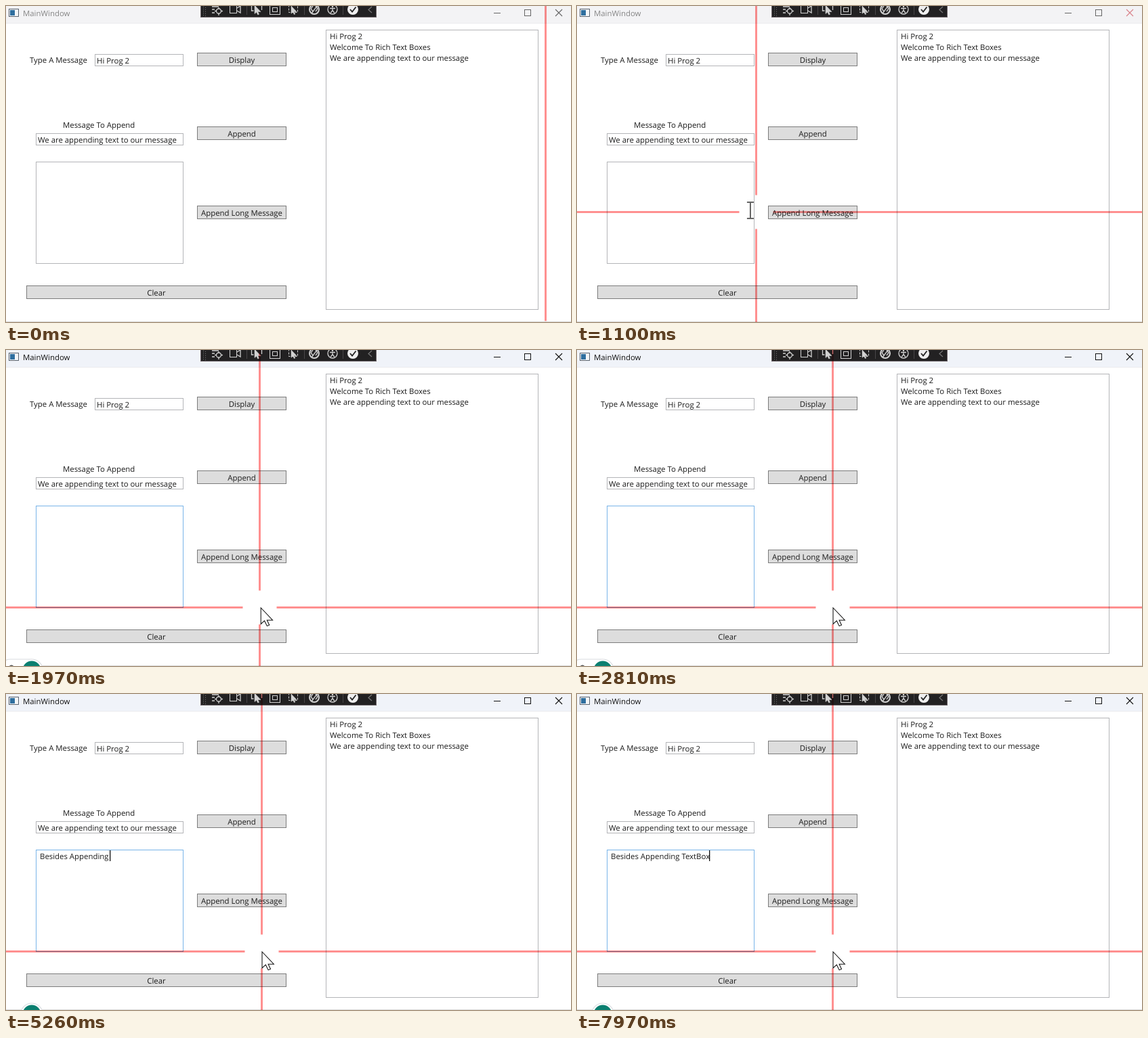
Write an HTML page with a canvas that moves like this. It is 834 px wide and 467 px high and loops after 8 s.

```html
<!DOCTYPE html>
<html lang="en">
<head>
<meta charset="utf-8">
<title>MainWindow</title>
<style>
html, body { margin: 0; width: 834px; height: 467px; overflow: hidden; background: #fff; }
canvas { display: block; }
</style>
</head>
<body>
<canvas id="stage" width="834" height="467"></canvas>
<script>
const c = document.getElementById('stage').getContext('2d');
const LOOP = 8000, FOCUS = 1310, BLINK = 500, STEP = 74;
const INK = '#1b1b1b', EDGE = '#b4b5b8', ICON = '#d2d2d2';

const clamp = v => Math.min(1, Math.max(0, v));
const mix = (a, b, k) => a + (b - a) * k;
const easeOut = (k, power) => 1 - (1 - clamp(k)) ** power;

// Typing speed: a quick run, a hesitant word start, a quick finish.
const message = 'Besides Appending TextBox';
const pace = [[1, 3110], [18, 5110], [21, 7050], [25, 7750]];
const keys = [...message].map((_, i) => {
  const s = Math.max(1, pace.findIndex(p => p[0] >= i + 1));
  const [n0, t0] = pace[s - 1], [n1, t1] = pace[s];
  return mix(t0, t1, (i + 1 - n0) / (n1 - n0));
});

function text(s, x, y, color = INK, align = 'left') {
  c.fillStyle = color;
  c.textAlign = align;
  c.fillText(s, x, y);
}

function rect(x, y, w, h, fill, stroke) {
  if (fill) {
    c.fillStyle = fill;
    c.fillRect(x, y, w, h);
  }
  if (!stroke) return;
  c.strokeStyle = stroke;
  c.lineWidth = 1;
  c.strokeRect(x + .5, y + .5, w - 1, h - 1);
}

function disc(x, y, r, fill, stroke, width = 1.3) {
  c.beginPath();
  c.arc(x, y, r, 0, 7);
  if (fill) { c.fillStyle = fill; c.fill(); }
  if (stroke) { c.strokeStyle = stroke; c.lineWidth = width; c.stroke(); }
}

// Strokes, and optionally fills, an SVG path placed at x, y.
function shape(d, x, y, stroke, width = 1.3, fill, scale = 1) {
  const p = new Path2D(d);
  c.save();
  c.translate(x, y);
  c.scale(scale, scale);
  if (fill) { c.fillStyle = fill; c.fill(p); }
  c.strokeStyle = stroke;
  c.lineWidth = width;
  c.stroke(p);
  c.restore();
}

function arrow(x, y, scale, fill, stroke) {
  shape('M0 0V25L5.5 20L9.5 28L13 26.5L9.5 19H18Z', x, y, stroke, 1.1, fill, scale);
}

function iBeam(x, y, color) {
  shape('M0-11V11M-5-12H5M-5 12H5', x, y, color, 1.5);
}

function titleBar(t) {
  const active = t >= FOCUS, ink = active ? '#111' : '#666';
  rect(0, 0, 834, 25, active ? '#f0f3f9' : '#f3f3f5');
  rect(0, 25, 834, 1, '#ebebee');
  rect(4, 4, 15, 12, '#f4f6f8', '#5a6470');
  rect(6, 6, 7, 8, '#2f6f9f');
  text('MainWindow', 25, 15, active ? '#111' : '#858585');
  shape('M0 0H10', 720, 10.5, ink, 1);
  rect(765, 5, 10, 10, null, ink);
  shape('M-5-5L5 5M5-5L-5 5', 816, 10, t >= 70 && !active ? '#d98088' : ink, 1.1);
}

function toolbar() {
  rect(287, -2, 260, 19, '#222122', '#6d6468');
  for (let y = 1; y < 14; y += 3) {
    rect(291, y, 1, 1, '#777');
    rect(294, y + 1, 1, 1, '#777');
  }
  for (const x of [355, 440, 497]) rect(x, 0, 1, 13, '#484648');

  shape('M0 1H10M0 5H4M0 10H4M10 2V14M4 7.5H16', 304, 0, ICON);
  disc(314, 7.5, 3.5, '#222122', ICON);
  rect(330, -2, 11, 13, null, ICON);
  shape('M0 3L5 0V10L0 7', 341, 0, ICON);
  shape('M0-1V7H3M15-1V6', 362.5, 0, ICON);
  arrow(367, -1, .5, ICON, ICON);
  rect(389, -2, 16, 15, null, ICON);
  rect(393, 2, 8, 7, null, ICON);
  c.setLineDash([3, 2]);
  rect(417, -2, 14, 12, null, ICON);
  c.setLineDash([]);
  arrow(421, 0, .45, ICON, ICON);
  disc(455, 5, 7, null, ICON, 2);
  shape('M-2-5L-5-1L-2 3M2-5L5-1L2 3M-4 6L4-5', 455, 5, ICON);
  disc(482, 5, 7, null, ICON);
  disc(482, 1, 1.2, ICON);
  shape('M-4 0H4M0 0V3L-3 7M0 3L3 7', 482, 3.5, ICON);
  disc(512, 5, 8, '#efefef');
  shape('M-4 0L-1 3.5L4.5-3.5', 512, 5, '#222', 1.8);
  shape('M5 0L0 4.5L5 9', 535, 1, '#777', 1.2);
}

function button(s, x, y, w) {
  rect(x, y, w, 20, '#dddddd', '#7c7c7c');
  text(s, x + w / 2, y + 15, INK, 'center');
}

function form(t) {
  text('Type A Message', 35, 84);
  rect(131, 71, 131, 18, '#fff', EDGE);
  text('Hi Prog 2', 134, 85);
  text('Message To Append', 84, 180);
  rect(44, 188, 218, 18, '#fff', EDGE);
  text('We are appending text to our message', 47, 202);
  rect(44, 230, 218, 151, '#fff', t >= FOCUS ? '#78b4e8' : EDGE);
  button('Display', 282, 69, 132);
  button('Append', 282, 178, 132);
  button('Append Long Message', 282, 295, 132);
  button('Clear', 30, 413, 384);
  rect(472, 35, 314, 414, '#fff', EDGE);
  ['Hi Prog 2', 'Welcome To Rich Text Boxes', 'We are appending text to our message']
    .forEach((s, i) => text(s, 478, 49 + 16 * i));
  rect(0, 466, 834, 1, '#dcdcdc');
}

function typing(t) {
  const count = keys.filter(k => k <= t).length;
  const typed = message.slice(0, count);
  text(typed, 50, 244);
  const since = t - (count ? keys[count - 1] : FOCUS);
  if (since >= 0 && since % (2 * BLINK) < BLINK)
    rect(Math.floor(49.5 + c.measureText(typed).width), 231, 1.3, 16, '#111');
}

function badge(t) {
  if (t < 1960) return;
  const k = clamp((t - 4700) / 400), left = mix(-10, 21.5, k);
  c.beginPath();
  c.roundRect(left, 457, 54.5 - left, 33, 16.5);
  c.fillStyle = '#fff';
  c.fill();
  c.strokeStyle = '#d9dce0';
  c.lineWidth = 1.2;
  c.stroke();
  if (k === 0) disc(8, 469, 3.5, '#555');
  disc(38, 473, 13.5, '#0b7f70');
}

// Leaves at the right, comes back to the click point, then settles lower right.
function pointAt(t) {
  if (t < 570) return [796.5 + .0054 * t * t, 490];
  const into = easeOut((t - 578) / 812, 2), out = (t - 1460) / 640;
  return [
    mix(600, 213.5, into) + 164 * easeOut(out, 3.34),
    mix(420, 287.5, into) + 93 * easeOut(out, 9.5)
  ];
}

function pointer(t) {
  // The crosshair moves in steps; the cursor runs slightly ahead of it.
  const held = Math.max(0, 60 + STEP * Math.floor((t - 60) / STEP));
  const [x, y] = pointAt(held).map(v => Math.floor(v) + .5);
  const [px, py] = pointAt(held + 25);

  c.globalCompositeOperation = 'multiply';
  c.fillStyle = '#ff9090';
  c.fillRect(x - 1.5, 0, 3, y - 25);
  c.fillRect(x - 1.5, y + 25, 3, 467);
  c.fillRect(0, y - 1.5, x - 25, 3);
  c.fillRect(x + 25, y - 1.5, 834, 3);
  c.globalCompositeOperation = 'source-over';

  const clicked = t >= FOCUS && t < 1610;
  if (clicked) {
    disc(213, 287, 20, '#ffff45');
    iBeam(214, 287, '#ffffa0');
  }
  const inBox = px > 44 && px < 262 && py > 230 && py < 381;
  if (!inBox) arrow(px + .5, py + .5, .96, '#fff', '#111');
  else if (!clicked) iBeam(px, py, '#333');
}

function draw(now) {
  const t = now % LOOP;
  c.font = '11.4px "Open Sans", "Noto Sans", sans-serif';
  c.textRendering = 'geometricPrecision';
  rect(0, 0, 834, 467, '#fff');
  titleBar(t);
  toolbar();
  form(t);
  typing(t);
  badge(t);
  pointer(t);
  requestAnimationFrame(draw);
}
requestAnimationFrame(draw);
</script>
</body>
</html>
```
